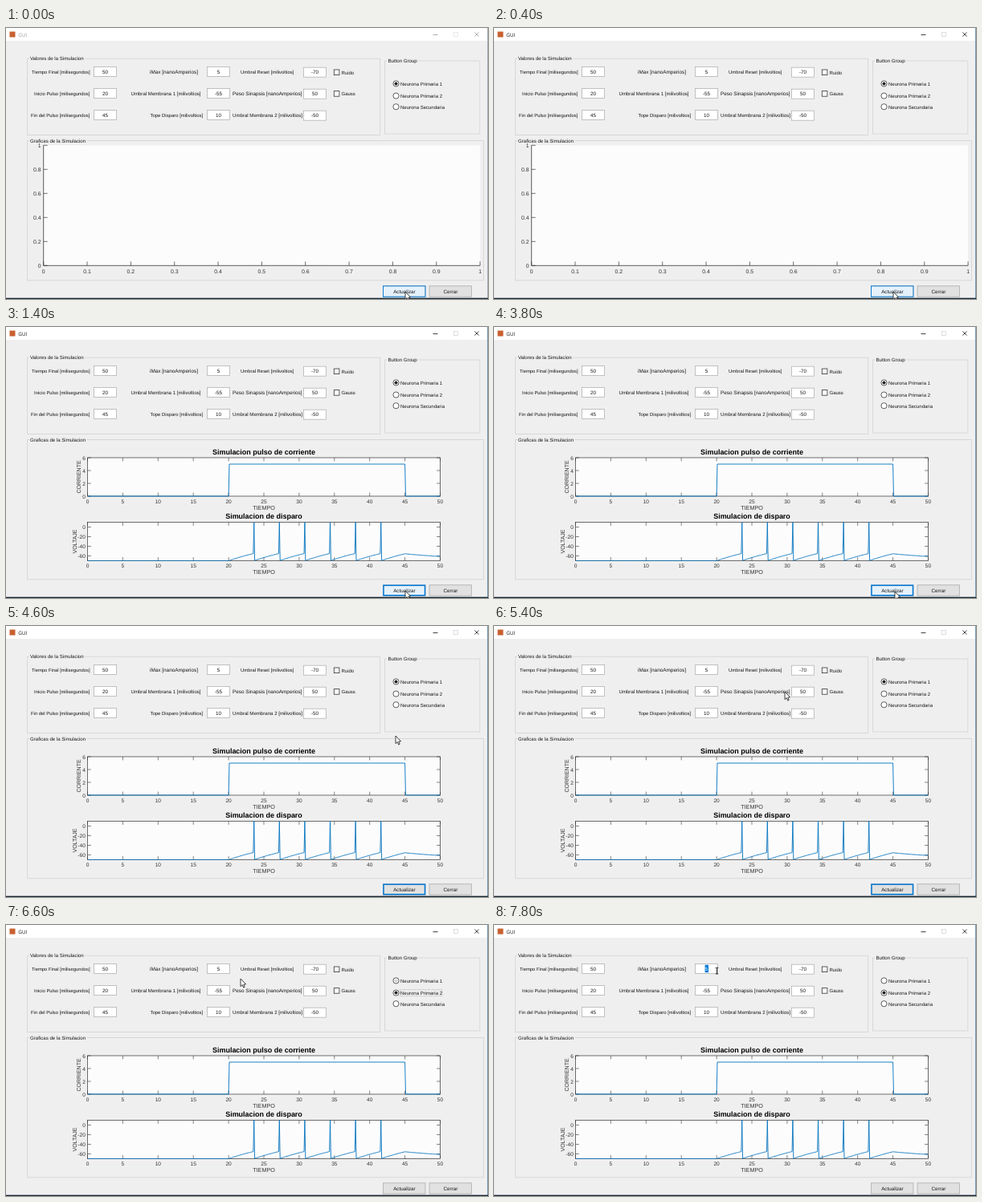
Recreate the animation shown at these times as an HTML page with a canvas. Size 600 px wide and 338 px high, loop 8000 ms.

```html
<!DOCTYPE html>
<html lang="es">
<head>
<meta charset="utf-8">
<title>GUI</title>
<style>
  html, body { margin: 0; width: 100%; height: 100%; overflow: hidden; background: #f0eff0; }
  canvas { display: block; width: 600px; height: 338px; }
</style>
</head>
<body>
<canvas id="stage" width="600" height="338"></canvas>
<script>
const ctx = document.getElementById('stage').getContext('2d');
const LOOP = 8000;
const BG = '#f0eff0', INK = '#161616', AXIS = '#333', BLUE = '#0078d7', PLOT = '#0072bd';
const SANS = '"Liberation Sans", Arial, sans-serif';

function text(str, x, y, size = 6, { align = 'left', color = INK, weight = '', font = SANS } = {}) {
  ctx.font = `${weight} ${size}px ${font}`;
  ctx.textAlign = align;
  ctx.fillStyle = color;
  ctx.fillText(str, x, y);
}

function upText(str, x, y, size) {
  ctx.save();
  ctx.translate(x, y);
  ctx.rotate(-Math.PI / 2);
  text(str, 0, 0, size, { align: 'center', color: AXIS });
  ctx.restore();
}

function box(x, y, w, h, fill, stroke, width = 1) {
  if (fill) { ctx.fillStyle = fill; ctx.fillRect(x, y, w, h); }
  if (stroke) {
    ctx.strokeStyle = stroke;
    ctx.lineWidth = width;
    ctx.strokeRect(x, y, w, h);
  }
}

function line(points, color, width) {
  ctx.beginPath();
  points.forEach(([x, y]) => ctx.lineTo(x, y));
  ctx.strokeStyle = color;
  ctx.lineWidth = width;
  ctx.stroke();
}

function panel(title, x, y, w, h, tx, tw) {
  box(x, y, w, h, null, '#d6d6d6', 0.9);
  ctx.fillStyle = BG;
  ctx.fillRect(tx - 1, y - 2, tw + 2, 4);
  text(title, tx, y + 2, 6.1);
}

function titleBar(active) {
  const ink = active ? '#111' : '#9a9a9a';
  ctx.fillStyle = '#fff';
  ctx.fillRect(0, 0, 600, 16);
  box(4.5, 4.5, 7, 7, '#c8602f');
  text('GUI', 15.3, 10.5, 6.3, { color: ink, font: '"Open Sans", sans-serif' });
  line([[531.5, 8.5], [537.5, 8.5]], ink, 0.8);
  box(557.5, 5.5, 5, 5, null, active ? '#cfcfcf' : '#e2e2e2', 0.7);
  line([[583.3, 5.4], [588.5, 10.6]], ink, 0.8);
  line([[588.5, 5.4], [583.3, 10.6]], ink, 0.8);
}

// Columns of the form: box x, y shift, then [label, label x, size, value] per row
const FORM = [
  [109.5, 0, [
    ['Tiempo Final [milisegundos]', 32, 5.85, '50'],
    ['Inicio Pulso [milisegundos]', 35, 5.9, '20'],
    ['Fin del Pulso [milisegundos]', 31, 5.9, '45']]],
  [250.5, 0, [
    ['iMax [nanoAmperios]', 179, 6.4, '5'],
    ['Umbral Membrana 1 [milivoltios]', 155.5, 6.1, '-55'],
    ['Tope Disparo [milivoltios]', 179.5, 5.95, '10']]],
  [370.5, 0.7, [
    ['Umbral Reset [milivoltios]', 292, 5.9, '-70'],
    ['Peso Sinapsis [nanoAmperios]', 282, 6.35, '50'],
    ['Umbral Membrana 2 [milivoltios]', 282, 6.1, '-50']]]
];

function form() {
  for (const [x, dy, rows] of FORM) {
    rows.forEach(([label, lx, size, value], i) => {
      const y = 48.5 + 27 * i + dy;
      text(label, lx, 57 + 27 * i + (i ? 0.2 : 0), size);
      box(x, y, 28, 12, '#fff', '#b4b4b4', 0.8);
      text(value, x + 14, y + 8.2, 6.3, { align: 'center' });
    });
  }
}

function check(label, y, hover) {
  box(408.3, y, 6.6, 6.6, '#fff', hover ? BLUE : '#333', 0.8);
  text(label, 417.5, y + 5.7, 6);
}

function radio(label, y, dot, hover) {
  ctx.beginPath();
  ctx.arc(485.5, y, 3.6, 0, 7);
  ctx.fillStyle = '#fff';
  ctx.fill();
  ctx.strokeStyle = hover ? BLUE : '#333';
  ctx.lineWidth = 0.8;
  ctx.stroke();
  if (dot) {
    ctx.globalAlpha = dot;
    ctx.beginPath();
    ctx.arc(485.5, y, 2, 0, 7);
    ctx.fillStyle = hover ? BLUE : '#222';
    ctx.fill();
    ctx.globalAlpha = 1;
  }
  text(label, 491, y + 2.4, 6);
}

function button(label, x, { fill = '#e1e1e1', glow = 0, thick = false } = {}) {
  box(x, 321.8, 52.5, 13.4, fill, '#adadad', 0.8);
  if (glow) {
    ctx.globalAlpha = glow;
    if (thick) box(x + 0.5, 322.3, 51.5, 12.4, null, BLUE, 1.5);
    else box(x, 321.8, 52.5, 13.4, null, BLUE, 0.9);
    ctx.globalAlpha = 1;
  }
  text(label, x + 26.4, 330.8, 6.25, { align: 'center' });
}

function emptyAxes() {
  const x0 = 46.7, y0 = 296.3, w = 543.4, h = 150;
  ctx.fillStyle = '#fdfcfd';
  ctx.fillRect(x0, y0 - h, w, h);
  line([[x0, y0 - h], [x0, y0], [x0 + w, y0]], AXIS, 0.8);
  for (let i = 0; i <= 10; i++) {
    const x = x0 + w * i / 10;
    line([[x, y0], [x, y0 - 5]], AXIS, 0.7);
    text(String(i / 10), x, 306.2, 6.9, { align: 'center', color: AXIS });
  }
  for (let i = 0; i <= 5; i++) {
    const y = y0 - h * i / 5;
    line([[x0, y], [x0 + 5, y]], AXIS, 0.7);
    text(String(i / 5), 43.6, y + 2.6, 6.9, { align: 'right', color: AXIS });
  }
}

const X0 = 101.5, XS = 8.78, X1 = X0 + 50 * XS;

function chart(title, yLabel, labelX, top, bottom, lo, hi, ticks, data) {
  const toY = v => bottom + (top - bottom) * (v - lo) / (hi - lo);
  box(X0, top, X1 - X0, bottom - top, '#fdfcfd', AXIS, 0.7);
  for (let v = 0; v <= 50; v += 5) {
    const x = X0 + v * XS;
    line([[x, bottom], [x, bottom - 4.4]], AXIS, 0.6);
    line([[x, top], [x, top + 4.4]], AXIS, 0.6);
    text(String(v), x, bottom + 8.8, 6.6, { align: 'center', color: AXIS });
  }
  for (const v of ticks) {
    const y = toY(v);
    line([[X0, y], [X0 + 4.4, y]], AXIS, 0.6);
    line([[X1, y], [X1 - 4.4, y]], AXIS, 0.6);
    text(String(v), 98.8, y + 2.5, 6.6, { align: 'right', color: AXIS });
  }
  line(data.map(([t, v]) => [X0 + t * XS, toY(v)]), PLOT, 0.9);
  text(title, 321, top - 4.1, 8.97, { align: 'center', weight: 'bold', color: '#000' });
  text('TIEMPO', 321, bottom + 16.9, 7.2, { align: 'center', color: AXIS });
  upText(yLabel, labelX, (top + bottom) / 2, 7);
}

const pulse = [[0, 0], [20, 0], [20.1, 5], [45, 5], [45.1, 0], [50, 0]];

// Leaky integrate-and-fire neuron, 0.1 ms steps
const spikes = (() => {
  const out = [];
  let v = -70;
  for (let n = 0; n <= 500; n++) {
    const drive = n > 200 && n <= 450 ? 50 : 0;
    if (n) v += 0.01 * (drive - (v + 70));
    const fired = v >= -55;
    out.push([n / 10, fired ? 10 : v]);
    if (fired) v = -70;
  }
  return out;
})();

function charts() {
  chart('Simulacion pulso de corriente', 'CORRIENTE', 93, 163, 211, 0, 6, [0, 2, 4, 6], pulse);
  chart('Simulacion de disparo', 'VOLTAJE', 87.5, 243.5, 291.5, -70, 10, [-60, -40, -20, 0], spikes);
}

// Pointer stops: time, x, y
const PATH = [
  [0, 497, 329], [3800, 499, 330], [4000, 526, 319], [4200, 540, 260], [4400, 541, 188],
  [4600, 485, 137], [4800, 381, 103], [5000, 324, 93], [5200, 320, 87], [5400, 362, 82],
  [5600, 459, 85], [5800, 487, 86], [6400, 361, 74], [6600, 292, 67], [6800, 276, 61]
];
const ARROW = [[0, 0], [0, 9.6], [2.2, 7.6], [3.7, 11], [5.2, 10.3], [3.8, 7.1], [6.6, 6.9]];

function pointer(t) {
  if (t >= 7000) {
    line([[275.7, 53.3], [279.3, 53.3]], '#111', 0.8);
    line([[277.5, 53.3], [277.5, 61]], '#111', 0.9);
    line([[275.7, 61], [279.3, 61]], '#111', 0.8);
    return;
  }
  const [, x, y] = PATH.findLast(p => p[0] <= t);
  ctx.beginPath();
  ARROW.forEach(([dx, dy]) => ctx.lineTo(x + dx, y + dy));
  ctx.closePath();
  ctx.fillStyle = '#fff';
  ctx.fill();
  ctx.strokeStyle = '#111';
  ctx.lineWidth = 0.8;
  ctx.stroke();
}

function selection(t) {
  if (t < 7000) return;
  if (t >= 7200) {
    box(262.6, 49.8, 4.4, 9.4, BLUE);
    text('5', 264.5, 56.7, 6.3, { align: 'center', color: '#fff' });
  }
  if (t < 7800) line([[266.5, 50], [266.5, 59]], t < 7200 ? '#111' : '#ff8728', 0.6);
}

function updateButton(t) {
  const hot = '#e5f1fb';
  if (t < 800) return { fill: hot, glow: 1 };
  if (t < 1000) return { fill: '#cce4f7', glow: 1 };
  if (t < 4000) return { fill: hot, glow: 1, thick: true };
  const glow = t < 6200 ? 1 : t < 6400 ? 0.6 : t < 6600 ? 0.25 : 0;
  return { glow, thick: true };
}

function draw(t) {
  ctx.textRendering = 'geometricPrecision';
  ctx.fillStyle = BG;
  ctx.fillRect(0, 0, 600, 338);
  titleBar(t >= 400);

  panel('Valores de la Simulacion', 26.5, 38.2, 439, 95.3, 30, 67);
  form();
  check('Ruido', 52, false);
  check('Gauss', 78.6, t >= 5800 && t < 6000);

  panel('Button Group', 471.5, 41, 118.3, 91, 475.5, 36);
  const onFirst = t < 6400 ? 1 : t < 6600 ? 0.5 : t < 6800 ? 0.2 : 0;
  const onSecond = t < 6200 ? 0 : t < 6400 ? 0.6 : 1;
  radio('Neurona Primaria 1', 69.4, onFirst, false);
  radio('Neurona Primaria 2', 84.6, onSecond, t >= 6000 && t < 6400);
  radio('Neurona Secundaria', 98.2, 0, false);
  if (t >= 6200 && t < 7000) {
    ctx.setLineDash([0.6, 0.6]);
    box(490.3, 80.6, 52.4, 8, null, '#777', 0.5);
    ctx.setLineDash([]);
  }

  panel('Graficas de la Simulacion', 26.5, 140.5, 568, 174.3, 30, 69.5);
  if (t < 1400) emptyAxes(); else charts();

  button('Actualizar', 469.5, updateButton(t));
  button('Cerrar', 527, {});

  ctx.fillStyle = t < 400 ? '#8b9aa3' : '#3f7394';
  ctx.fillRect(599.3, 0, 0.7, 338);
  ctx.fillStyle = '#12242f';
  ctx.fillRect(0, 336.7, 600, 1.3);

  selection(t);
  pointer(t);
}

function tick(now) {
  draw(now % LOOP);
  requestAnimationFrame(tick);
}
requestAnimationFrame(tick);
</script>
</body>
</html>
```
